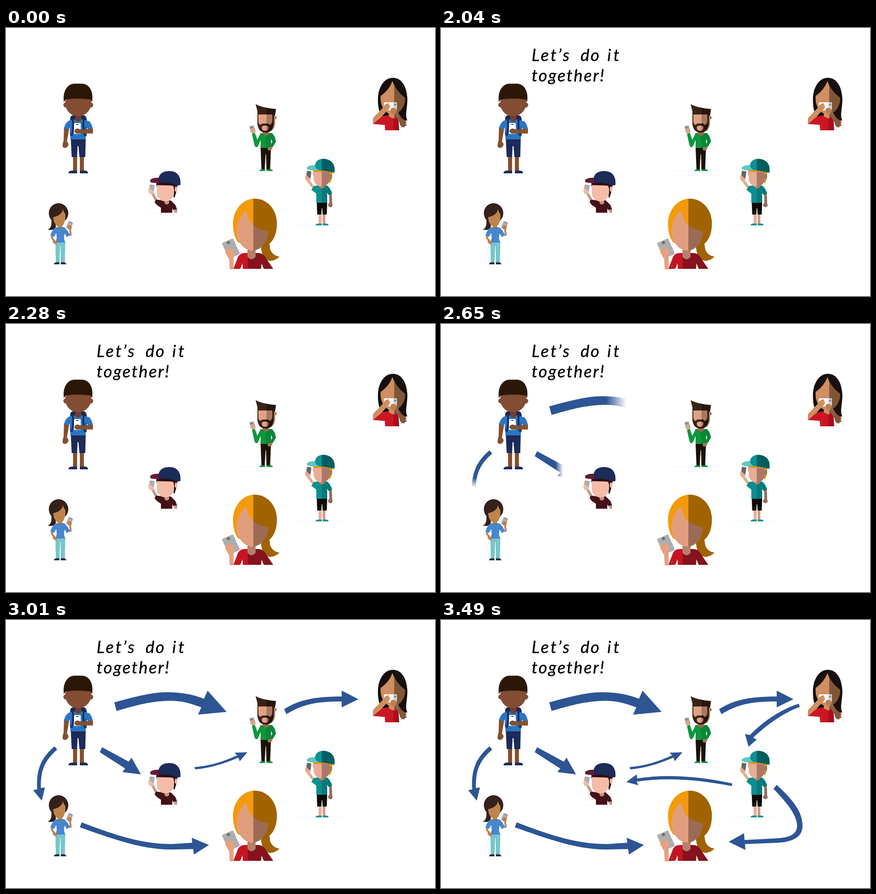
An HTML page for the animation above (5.04 s loop, 947x592 px).

```html
<!DOCTYPE html>
<html lang="en">
<head>
<meta charset="utf-8">
<title>Let's do it together</title>
<style>
  html, body { margin: 0; width: 100%; height: 100%; overflow: hidden; background: #fff; }
  svg { display: block; width: 947px; height: 592px; }
  #slogan { font: italic 400 37px Lato, "Open Sans", sans-serif; letter-spacing: 2.6px; stroke: #000; stroke-width: .4; }
  .limb { fill: none; stroke-linejoin: round; }
  .floor { stroke: #f4f4f4; }
</style>
</head>
<body>
<svg viewBox="0 0 947 592">
  <defs id="defs"></defs>

  <path class="floor" d="M513 315.5H617M640 435.5H745M312 408.5H378M480 532.5H604"/>

  <!-- boy with backpack -->
  <g>
    <path d="M148 284H157V317H148ZM163 284H172V317H163Z" fill="#84502f"/>
    <path d="M138 321Q138 315 145 315H157V321ZM163 321V315H174Q181 315 181 321Z" fill="#1c2b58"/>
    <path d="M143 245H176L175 285H162L160 261H158L157 285H145Z" fill="#1c2b58"/>
    <path d="M128 219H140L134 254H127Z" fill="#84502f"/>
    <path d="M126 251Q134 247 138 256Q138 264 130 265Q124 265 125 258Z" fill="#84502f"/>
    <path d="M142 207Q140 194 147 193H172Q179 194 178 207V236Q178 241 173 241H147Q141 241 141 234Z" fill="#1c2b58"/>
    <path d="M150 202H169L184 206Q189 211 192 223L182 224L176 218V246H142V219L138 224L128 221Q132 207 140 204Z" fill="#2b75c3"/>
    <path class="limb" d="M146 196Q151 215 145 238M173 196Q168 214 174 238" stroke="#1c2b58" stroke-width="4"/>
    <path d="M153 188H166V204Q160 210 153 204Z" fill="#6f4029"/>
    <rect x="150" y="210" width="15" height="24" rx="2" fill="#fff"/>
    <rect x="155" y="212" width="5" height="2" fill="#38588d"/>
    <path d="M192 222V233L164 233Q152 235 151 228Q151 223 158 222L168 225L182 223Z" fill="#84502f"/>
    <circle cx="132" cy="170" r="5.5" fill="#834d33"/><circle cx="187" cy="170" r="5.5" fill="#834d33"/>
    <path d="M131 151H188V168C187 184 173 195 159 195C145 195 132 184 131 168Z" fill="#834d33"/>
    <path d="M128 164C124 140 136 123 151 123H168C184 124 194 140 190 164L187 158Q159 154 131 158Z" fill="#2b1708"/>
  </g>

  <!-- woman with ponytail -->
  <g>
    <path d="M100 424Q111 430 110 439Q106 449 92 445Q102 442 100 424Z" fill="#35201a"/>
    <path d="M109 473H131L130 518H121L120.500 481H119.500L118 518H110Z" fill="#76c6cb"/>
    <path d="M106 522Q106 518 111 517.500H118V522ZM121 522V517.500H128Q133 518 133 522Z" fill="#1c2b48"/>
    <path class="limb" d="M104 454L101 463L109 473M137 456L143 457L141 441" stroke="#bd8450" stroke-width="4"/>
    <path d="M110 440H129L136 448L141 457L135 462L129 454L128 465L131 474H109L112 464L111 453L105 462L98 458Q102 445 110 440Z" fill="#4886d0"/>
    <path d="M102 470L111 470Q115 475 110 478L105 476Z" fill="#bd8450"/>
    <rect x="135" y="427" width="11" height="17" rx="1.500" transform="rotate(24 140 435)" fill="#aeb0b3"/>
    <circle cx="143" cy="430" r="1.300" fill="#666"/>
    <path d="M136 437Q140 433 145 438V444Q140 447 136 443Z" fill="#bd8450"/>
    <path d="M115 431H124V440Q120 446 115 440Z" fill="#9d6b3e"/>
    <ellipse cx="116" cy="409" rx="21.500" ry="22" fill="#35201a"/>
    <path d="M126 400Q123 414 104 418C105 432 113 440 119 440C127 438 132 428 131 411Q127 407 126 400Z" fill="#bd8450"/>
  </g>

  <!-- navy cap -->
  <g>
    <path class="limb" d="M336 388L322 363" stroke="#bca18f" stroke-width="6"/>
    <rect x="316" y="346" width="11" height="18" rx="1.500" transform="rotate(8 321 355)" fill="#aaadaf"/>
    <path d="M314 357Q317 352 321 357L326 362L324 368L316 366Z" fill="#f4bba8"/>
    <path d="M331 379L347 381H364L374 391L378 402L369 403L367 398V408H342V397L333 391L328 385Z" fill="#451016"/>
    <path d="M369 401L378 401V408H372Z" fill="#bca18f"/>
    <path d="M350 378H360V387Q355 393 350 387Z" fill="#c79588"/>
    <path d="M332 341H380L376 362L372 375L370 374V350H332Z" fill="#2b1012"/>
    <path d="M333 347L367 348Q372 350 371 364C370 377 361 383 352 383C341 383 333 375 333 365Z" fill="#f4bba8"/>
    <ellipse cx="375.500" cy="356" rx="3" ry="6" fill="#f4bba8"/>
    <path d="M318 336Q322 330 342 331L344 342Q326 343 320 341Q318 340 318 336Z" fill="#641b33"/>
    <path d="M337 331C339 320 350 315 362 316C378 317 387 327 385 347L377 348Q362 340 340 342Q337 338 337 331Z" fill="#1c2b57"/>
  </g>

  <!-- green jumper -->
  <g>
    <path d="M562 264H585L583 314H575L574 279H573L571 314H564Z" fill="#1c120a"/>
    <path d="M559 316Q560 312 566 312H572V316ZM576 316V312H583Q589 312 589 316Z" fill="#0c8f3c"/>
    <path d="M562 232H587Q594 238 596 251L588 264L582 261L588 251L585 245V265H562V247L556 262Q550 266 548 257L543 234L549 231L555 247Z" fill="url(#jumper)"/>
    <path d="M579 264L587 263L588 268L581 271L577 268Z" fill="#a97860"/>
    <rect x="539" y="216" width="10" height="15" rx="1.500" transform="rotate(-20 544 223)" fill="#a1a1a3"/>
    <circle cx="542" cy="219" r="1.300" fill="#555"/>
    <path d="M539 224Q544 221 548 223L551 230L544 234L540 230Z" fill="#dfa284"/>
    <path d="M567 226H580V234Q574 242 567 234Z" fill="#9a6951"/>
    <circle cx="594" cy="198" r="3.500" fill="#a97860"/>
    <path d="M556 186H594V210Q592 230 575 231Q558 230 556 211Z" fill="url(#manFace)"/>
    <path d="M551 168Q564 176 596 179L594 193L591 194V212C590 225 582 231 573 231C562 231 556 224 555 211V184ZM557 191V207Q558 214 563 214Q564 211 567 211H578Q581 211 581 214Q587 213 588 206V191ZM565 217Q563 227 572 227Q581 227 579 217Q572 214 565 217Z" fill="url(#beard)" fill-rule="evenodd"/>
  </g>

  <!-- dark-haired woman -->
  <g>
    <path d="M854 110C834 110 821 132 821 158Q821 183 829 195H845L864 199Q875 207 886 204C880 192 886 180 886 157C885 130 874 110 854 110Z" fill="#17100e"/>
    <path d="M810 199L832 195L844 193H863L866 196L868 226H837L836 214L810 212Z" fill="url(#redTop)"/>
    <path d="M845 182H866V194Q855 205 845 194Z" fill="url(#girlFace)"/>
    <path d="M853 117Q846 137 827 150C825 174 839 190 853 191C869 190 882 174 881 154Q860 138 853 117Z" fill="url(#girlFace)"/>
    <path d="M810 199L833 175L841 183L827 198L810 212Z" fill="#cf8f60"/>
    <path d="M857 183L862 181L869 193L885 215L874 220L864 200Z" fill="#906444"/>
    <path d="M866 193L884 207L879 220L870 215Z" fill="#80583d"/>
    <rect x="834" y="164" width="29" height="18" rx="3" fill="#f7f7f8"/>
    <path d="M855 164H860Q863 164 863 167V179Q863 182 860 182H855Z" fill="#d3d3d5"/>
    <circle cx="859" cy="169" r="2" fill="#777"/>
    <path d="M832 178Q834 168 844 166L848 174Q845 181 838 185Z" fill="#cf8f60"/>
    <path d="M849 179L854 176Q861 177 863 182L858 192L851 190Z" fill="#b97f55"/>
  </g>

  <!-- teal cap -->
  <g>
    <path d="M690 410H697V433H690Z" fill="#e7b3a0"/>
    <path d="M699 410H705V433H699Z" fill="#d09c88"/>
    <path d="M683 436Q684 432 690 432H697V436ZM699 436V432H706Q712 432 712 436Z" fill="#0d8e8e"/>
    <path d="M686 385H709L708 412H699L698 398H697L696 412H687Z" fill="#0d0b0b"/>
    <path class="limb" d="M679 353L665 334" stroke="#e3aa92" stroke-width="6"/>
    <path class="limb" d="M716 362L717 388" stroke="#936b5c" stroke-width="6"/>
    <circle cx="716" cy="391" r="5" fill="#936b5c"/>
    <path d="M686 348H709Q716 353 720 366L712 369L709 364V386H685V366L674 357L680 349Z" fill="url(#tee)"/>
    <path d="M691 340H704V351Q698 358 691 351Z" fill="#b17e69"/>
    <rect x="663" y="316" width="10" height="17" rx="1.500" transform="rotate(8 668 325)" fill="#626466"/>
    <path d="M660 328Q664 322 667 329L673 333L669 338L661 335Z" fill="#e3aa92"/>
    <path d="M678 312H721L719 334L714 345L711 326H678Z" fill="#e49516"/>
    <path d="M679 318H714L716 332C714 344 706 350 697 350C686 350 679 342 679 331Z" fill="url(#capFace)"/>
    <ellipse cx="717" cy="328" rx="3" ry="5" fill="#a8745f"/>
    <path d="M664 309Q666 302 685 303L697 314Q674 316 667 313Q664 312 664 309Z" fill="#63c5be"/>
    <path d="M682 304C683 293 692 288 702 289C719 290 728 302 725 320Q711 316 697 315Q684 314 682 304Z" fill="url(#cap)"/>
  </g>

  <!-- blonde woman -->
  <g>
    <path d="M563 476Q563 465 574 461Q582 470 583 488Q588 503 604 505Q592 516 580 514Q562 508 563 476Z" fill="#a06300"/>
    <path d="M502 532L512 506Q516 497 528 497H556Q566 497 571 504L590 532H569L564 520L563 532H523L522 520L517 532Z" fill="url(#redShirt)"/>
    <path d="M533 485H551V505Q542 517 533 505Z" fill="#b5806a"/>
    <path d="M549 377C522 377 501 402 501 433C501 451 506 466 513 474L572 482C590 475 598 455 598 432C598 400 576 377 549 377Z" fill="url(#blonde)"/>
    <path d="M531 402Q534 442 578 449C580 470 563 492 543 492C524 490 510 473 509 449C510 427 518 414 531 402Z" fill="url(#blondeFace)"/>
    <path d="M492 500H503L502 533H494Z" fill="#e6a180"/>
    <rect x="483" y="468" width="27" height="38" rx="3" transform="rotate(-24 497 487)" fill="#adadaf"/>
    <circle cx="491" cy="474" r="3" fill="#555"/><circle cx="491" cy="474" r="1.200" fill="#999"/>
    <path d="M484 489Q492 483 502 489L504 501Q500 511 491 508L484 496Z" fill="#e6a180"/>
  </g>

  <g id="arrows"></g>

  <text id="slogan" visibility="hidden">
    <tspan x="200" y="73" letter-spacing="4">Let’s</tspan>
    <tspan x="308" y="73">do</tspan>
    <tspan x="367" y="73" letter-spacing="5">it</tspan>
    <tspan x="200" y="118">together!</tspan>
  </text>
</svg>

<script>
const LOOP = 5040, TICK = 40, TEXT_AT = 1800, SOFT = 0.18;
const BLUE = '#2d5594';
const defs = document.getElementById('defs');
const slogan = document.getElementById('slogan');

function make(tag, attrs, parent) {
  const el = document.createElementNS('http://www.w3.org/2000/svg', tag);
  for (const k in attrs) el.setAttribute(k, attrs[k]);
  return parent.appendChild(el);
}

function gradient(id, attrs) {
  return make('linearGradient', { id, gradientUnits: 'userSpaceOnUse', y1: 0, y2: 0, ...attrs }, defs);
}

// Two flat tones that meet on a vertical line
function split(id, x, left, right) {
  const g = gradient(id, { x1: x, x2: x + 0.1 });
  make('stop', { offset: 0, 'stop-color': left }, g);
  make('stop', { offset: 1, 'stop-color': right }, g);
}

split('jumper', 574, '#0c963e', '#0a8638');
split('manFace', 575, '#dfa284', '#a97860');
split('beard', 575, '#3a2314', '#25150c');
split('redTop', 855, '#cb1622', '#a70f1b');
split('girlFace', 857, '#cf8f60', '#805638');
split('tee', 697, '#0d8e8e', '#067a7b');
split('capFace', 697, '#e7ad97', '#ad7966');
split('cap', 697, '#0d9293', '#005e60');
split('redShirt', 534, '#c51422', '#85121d');
split('blonde', 546, '#f39a0b', '#a06300');
split('blondeFace', 546, '#e19e7f', '#9c6b55');

// start time, axis, wipe from, wipe to, outline
const arrows = [
  [2570, 'x', 240, 487, 'M239 182C300 165 330 159 360 159.500C390 160 414 165 437 174L445 156L487 203L424 209L431 193C405 183 385 178 360 178.500C325 179 290 187 244 201Z'],
  [2570, 'y', 279, 399, 'M107 279L113 286C88 309 76 328 77 371L86 370L79 399L60 376L69 374C66 330 78 304 107 279Z'],
  [2570, 'x', 207, 298, 'M212 281L271 313L277 304L298 341L257 336L263 328L207 292Z'],
  [2810, 'x', 163, 448, 'M167 447C240 475 300 495 365 495L411 492L410 481L448 497L415 518L413 506L365 507C300 507 240 485 163 458Z'],
  [2810, 'x', 416, 533, 'M416 325C450 322 480 313 510 299L505 293L533 292L516 312L513 304C480 318 450 327 418 330Z'],
  [2810, 'x', 614, 778, 'M614 197C645 178 675 169 741 169V156L778 175L741 193V180C685 180 655 186 619 208Z'],
  [3050, 'y', 185, 280, 'M790 185C750 197 710 225 682 254L671 252L679 280L697 264L689 260C715 235 755 205 792 192Z'],
  [3290, 'x', 643, 409, 'M643 361L642 367C570 353 500 347 432 357L436 365L409 358L432 341L433 350C500 339 575 346 643 361Z'],
  [3290, 'y', 364, 508, 'M741 364C780 400 797 425 798 452C799 478 780 489 745 492L671 495L672 508L635 490L669 471L670 486L745 482C775 480 787 470 786 452C784 430 765 405 734 373Z']
].map(([start, axis, from, to, d], i) => {
  const grad = gradient('wipe' + i, { x1: 0, x2: 0 });
  make('stop', { offset: 0, 'stop-color': BLUE }, grad);
  make('stop', { offset: 1, 'stop-color': BLUE, 'stop-opacity': 0 }, grad);
  const path = make('path', { d, fill: `url(#wipe${i})` }, document.getElementById('arrows'));
  return { start, axis, from, to, grad, path };
});

function wipe(a, t) {
  const step = Math.floor((t - a.start) / TICK);
  const p = Math.min(1, (step + 0.9) / 5);
  a.path.setAttribute('visibility', step < 0 ? 'hidden' : 'visible');
  if (step < 0) return;
  const edge = p * (1 + SOFT);
  const at = k => a.from + (a.to - a.from) * k;
  a.grad.setAttribute(a.axis + 1, at(edge - SOFT));
  a.grad.setAttribute(a.axis + 2, at(edge));
}

const began = performance.now();

function draw(now) {
  const t = Math.max(0, now - began) % LOOP;
  slogan.setAttribute('visibility', t < TEXT_AT ? 'hidden' : 'visible');
  arrows.forEach(a => wipe(a, t));
  requestAnimationFrame(draw);
}
draw(began);
</script>
</body>
</html>
```
